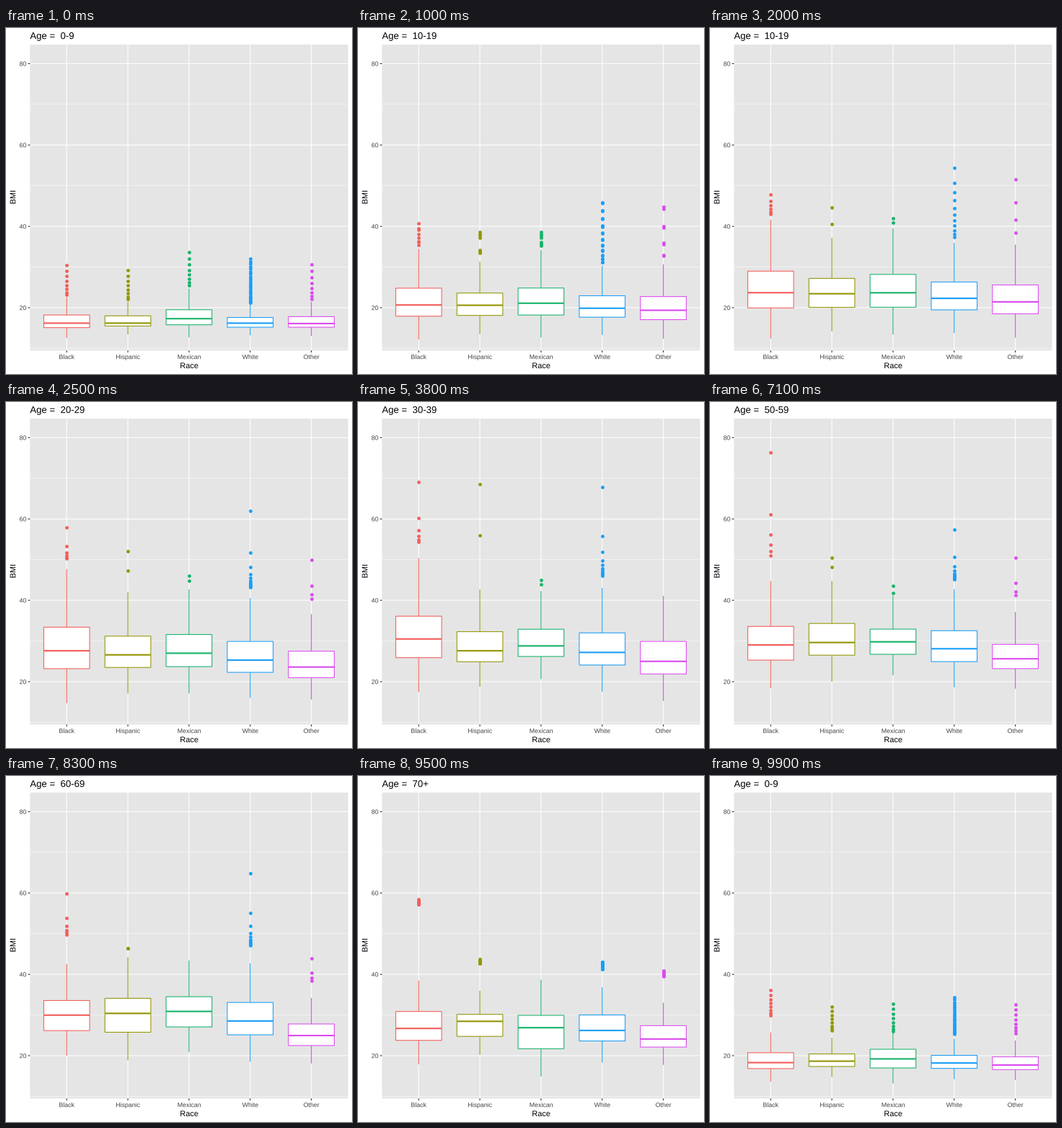
Write a matplotlib script that moves like this. It is 480x480 px and loops after 10 s.

```python
import numpy as np
import matplotlib.pyplot as plt
from matplotlib.animation import FuncAnimation
from matplotlib.patches import PathPatch, Rectangle
from matplotlib.textpath import TextPath
from matplotlib.transforms import Affine2D

plt.rcParams["font.family"] = "Liberation Sans"

SIZE, DPI = 480, 72  # at 72 dpi one point is one pixel
FRAMES, STEP_MS = 100, 100
MOVE_STARTS = [7, 20, 33, 46, 59, 71, 83, 95]
MOVE_STEPS = 6
AGES = ["0-9"] + [f"{d}-{d + 9}" for d in range(10, 70, 10)] + ["70+"]
OLDEST = len(AGES) - 1

LEFT, TOP, RIGHT, BOTTOM = 33.3, 23, 474.5, 447.4
UNIT = (RIGHT - LEFT) / 5.2
BOX_W = 0.75 * UNIT
LINE, THIN, THICK = 1.07, 0.53, 2.13
LABEL, DARK = "#444444", "#262626"


def y_px(bmi):
    return 388 - (np.asarray(bmi) - 20) * 5.643


def x_px(i):
    return LEFT + UNIT * (i + 0.6)


fig = plt.figure(figsize=(SIZE / DPI, SIZE / DPI), dpi=DPI, facecolor="white")
ax = fig.add_axes([0, 0, 1, 1])
ax.set_xlim(0, SIZE)
ax.set_ylim(SIZE, 0)
ax.axis("off")


def line(xs, ys, color, width, z):
    return ax.plot(xs, ys, color=color, lw=width, zorder=z, snap=False,
                   solid_capstyle="butt")[0]


def text_path(x, y, text, size, align=0.0, angle=0):
    """Outline of a text on a baseline; align runs from 0 (left) to 1 (right)."""
    path = TextPath((0, 0), text, size=size)
    shift = -align * path.get_extents().x1
    place = Affine2D().translate(shift, 0).scale(1, -1).rotate_deg(-angle).translate(x, y)
    return place.transform_path(path)


def write(*args, color="black", **kwargs):
    patch = PathPatch(text_path(*args, **kwargs), fc=color, lw=0, zorder=7, snap=False)
    ax.add_patch(patch)
    return patch


def outlier_values(age, upper, spread, top, count):
    """Dots from the fence up to the top: evenly when young, then ever sparser."""
    base = min(upper + 1.5 * spread, top)
    rank = np.arange(count)
    shape = (1 - rank / count) ** 1.5 if age < 2 else 1 / (rank + 1)
    return base + (top - base) * shape


def resample(values, n):
    """Spread a list over n slots, repeating entries where it is short."""
    picks = np.round(np.linspace(0, len(values) - 1, n)).astype(int)
    return values[picks]


class BoxPlot:
    """One group: quartiles and highest dot per age (0 for no dots)."""

    def __init__(self, i, color, lower, median, upper, top, young, adult):
        self.x = x_px(i)
        lower, median, upper = map(np.array, (lower, median, upper))
        spread = upper - lower
        age = np.arange(len(AGES))
        reach = 1.4 - 0.04 * np.maximum(age - 4, 0) ** 2
        self.boxes = np.column_stack([lower - 0.83 * spread, lower, median, upper,
                                      upper + reach * spread])
        counts = [young] + [adult] * (OLDEST - 1) + [1]
        # Without outliers, a dot waits at the median behind the box.
        self.outliers = [
            outlier_values(k, upper[k], spread[k], top[k], counts[k])
            if top[k] else median[k:k + 1] for k in age]

        self.dots = ax.scatter([], [], s=4.8 ** 2, color=color, linewidths=0,
                               zorder=3, snap=False)
        self.whiskers = line([], [], color, LINE, 4)
        self.box = Rectangle((self.x - BOX_W / 2, 0), BOX_W, 1, fc="white", ec=color,
                             lw=LINE, zorder=5, snap=False)
        ax.add_patch(self.box)
        self.middle = line([], [], color, THICK, 6)

    def update(self, a, b, t):
        low, q1, mid, q3, high = y_px((1 - t) * self.boxes[a] + t * self.boxes[b])
        self.whiskers.set_data([self.x] * 5, [low, q1, np.nan, q3, high])
        self.box.set_y(q3)
        self.box.set_height(q1 - q3)
        self.middle.set_data([self.x - BOX_W / 2, self.x + BOX_W / 2], [mid, mid])

        start, end = self.outliers[a], self.outliers[b]
        n = max(len(start), len(end))
        values = (1 - t) * resample(start, n) + t * resample(end, n)
        self.dots.set_offsets(np.column_stack([np.full(n, self.x), y_px(values)]))


def draw_panel():
    ax.add_patch(Rectangle((LEFT, TOP), RIGHT - LEFT, BOTTOM - TOP, fc="#E5E5E5",
                           lw=0, zorder=0, snap=False))
    for bmi in range(10, 81, 10):
        y = y_px(bmi)
        major = bmi % 20 == 0
        line([LEFT, RIGHT], [y, y], "white", LINE if major else THIN, 1)
        if major:
            line([LEFT - 2.75, LEFT], [y, y], DARK, LINE, 2)
            write(28, y + 3.2, str(bmi), 8.8, align=1, color=LABEL)
    for i, name in enumerate(["Black", "Hispanic", "Mexican", "White", "Other"]):
        x = x_px(i)
        line([x, x], [TOP, BOTTOM], "white", LINE, 2)
        line([x, x], [BOTTOM, BOTTOM + 2.75], DARK, LINE, 2)
        write(x, 459.2, name, 8.8, align=0.5, color=LABEL)
    write((LEFT + RIGHT) / 2, 472, "Race", 11, align=0.5)
    write(13.2, (TOP + BOTTOM) / 2, "BMI", 11, align=0.5, angle=90)


draw_panel()
title = write(LEFT, 15.2, "Age", 13.2)
plots = [
    BoxPlot(0, "#F35E5A",
            lower=[15.1, 19.3, 23.2, 25.9, 27.0, 25.1, 26.3, 25.5],
            median=[16.2, 22.9, 27.6, 30.5, 30.5, 28.8, 30.2, 28.8],
            upper=[18.2, 28.1, 33.4, 36.1, 35.9, 33.6, 33.6, 33.4],
            top=[30.5, 45.8, 58, 69, 59.3, 79.7, 59.1, 64], young=8, adult=6),
    BoxPlot(1, "#929705",
            lower=[15.5, 19.4, 23.5, 24.9, 26.1, 26.7, 25.6, 26.6],
            median=[16.2, 22.8, 26.6, 27.6, 28.9, 29.5, 30.3, 30.9],
            upper=[18.0, 26.4, 31.2, 32.3, 32.3, 34.3, 34.4, 32.6],
            top=[29.2, 43.2, 52, 68.6, 42.3, 51.3, 46.3, 46.7], young=8, adult=2),
    BoxPlot(2, "#18B36B",
            lower=[15.8, 19.4, 23.7, 26.2, 26.6, 26.5, 27.9, 22.9],
            median=[17.3, 23.0, 27.0, 28.8, 29.0, 29.5, 31.3, 28.8],
            upper=[19.5, 27.5, 31.6, 32.9, 32.9, 32.5, 35.0, 32.0],
            top=[33.6, 41.2, 46, 44.9, 52.3, 46.1, 0, 0], young=8, adult=2),
    BoxPlot(3, "#1B9FF5",
            lower=[15.2, 18.9, 22.3, 24.1, 24.2, 24.9, 25.1, 25.3],
            median=[16.2, 21.7, 25.3, 27.2, 27.7, 28.0, 28.6, 28.2],
            upper=[17.6, 25.6, 29.9, 32.0, 32.4, 32.4, 33.2, 32.5],
            top=[32.1, 52.8, 62, 67.8, 55.6, 55.1, 68.7, 45.3], young=24, adult=11),
    BoxPlot(4, "#DC4BEF",
            lower=[15.2, 18.0, 21.0, 21.9, 21.7, 23.4, 22.3, 23.5],
            median=[16.1, 21.0, 23.6, 25.0, 24.4, 25.8, 24.8, 25.7],
            upper=[17.8, 25.2, 27.5, 29.9, 28.2, 29.5, 27.5, 29.3],
            top=[30.6, 51.9, 50, 0, 41.5, 51.8, 44.2, 43], young=8, adult=4),
]


def update(frame):
    a = max(sum(frame >= start for start in MOVE_STARTS) - 1, 0)
    b = (a + 1) % len(AGES)
    t = min(max((frame - MOVE_STARTS[a] + 1) / MOVE_STEPS, 0), 1)
    title.set_path(text_path(LEFT, 15.2, "Age =  " + AGES[b if t >= 0.5 else a], 13.2))
    for plot in plots:
        plot.update(a, b, t)
    return []


anim = FuncAnimation(fig, update, frames=FRAMES, interval=STEP_MS,
                     init_func=lambda: update(0), repeat=True, repeat_delay=0)
plt.show()
```
